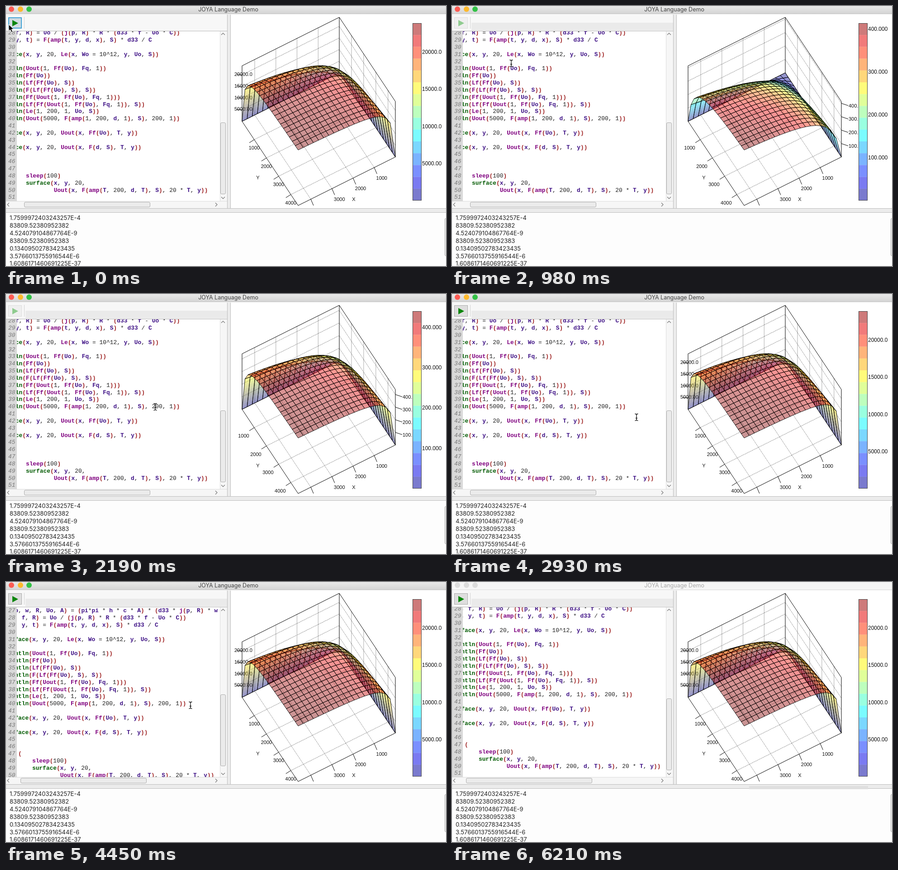
These frames come from a looping animation (973x576 px, 6.31 s). An HTML page:

```html
<!DOCTYPE html>
<html lang="en">
<head>
<meta charset="utf-8">
<title>JOYA Language Demo</title>
<style>
html, body { margin: 0; width: 100%; height: 100%; overflow: hidden; background: #fff; }
#stage { position: relative; width: 973px; height: 576px; overflow: hidden; background: #fff; }
#stage div, #stage svg { position: absolute; box-sizing: border-box; }
#stage svg { left: 0; top: 0; overflow: visible; }

#title { left: 0; top: 0; width: 973px; height: 18px; border-bottom: 1px solid #c6c6c6;
  background: linear-gradient(#e9e9e9, #d4d4d4);
  font: 12.5px/15px Inter, sans-serif; color: #444; text-align: center; padding-left: 10px; }
#title i { position: absolute; top: 1px; width: 12px; height: 12px; border-radius: 50%; background: var(--c); }
#title.idle { background: #f6f6f6; color: #a8a8a8; border-color: #d6d6d6; }
#title.idle i { background: #dcdcdc; }

#tools { left: 0; top: 19px; width: 489px; height: 37px; background: #f7f7f7; border-bottom: 1px solid #b8b8b8; }
#band { left: 43px; top: 18px; width: 446px; height: 17px; background: #eaeaea; }
#tools .sep { left: 40px; top: 5px; width: 1px; height: 26px; background: #d2d2d2; }
#run { left: 5px; top: 6px; width: 30px; height: 25px; border: 1px solid #a9a9a9; background: #dedede; }
#run.hot { border: 2px solid #42a3d6; background: #d0dbe1; }
#run.off { border-color: #dcdcdc; background: #efefef; }
#run::after { content: ""; position: absolute; left: 50%; top: 50%; margin: -7px 0 0 -6px;
  border: solid transparent; border-width: 7px 0 7px 13px; border-left-color: #0c860c; }
#run.off::after { border-left-color: #8fcb8f; }

.mono { font: 12.9px/15.83px "Liberation Mono", monospace; white-space: pre; color: #222; }
#gutter { left: 0; top: 56px; width: 24px; height: 376px; background: #d9d9d9; overflow: hidden; }
#nums { left: 5px; top: -51.2px; font-style: italic; color: #777; }
#editor { left: 24px; top: 56px; width: 449px; height: 376px; background: #fff; overflow: hidden; }
#code { left: -42px; top: -51.2px; }
.fn { color: #7f007f; font-weight: bold; }
.cmd { color: #005a00; font-weight: bold; }
.var { color: #3f1286; font-weight: bold; }
.par { color: #a02525; font-weight: bold; }

.track { background: #f6f6f6; }
.thumb { border: 1px solid #adadad; border-radius: 3px; background: #ebebeb; }
.split { background: #ececec; border: 0 solid #bcbcbc; }
#out { left: 8px; top: 461.3px; font: 13px/16.85px Inter, sans-serif; color: #222; white-space: pre; }
#plot text { font: 11px "Liberation Sans", Arial, sans-serif; fill: #111; }
#plot .big { font-size: 12px; }
</style>
</head>
<body>
<div id="stage">
  <div id="title">JOYA Language Demo<i style="left:6px;--c:#fc5b53"></i><i style="left:26px;--c:#fdb92c"></i><i style="left:45px;--c:#32c146"></i></div>
  <div id="tools"><div id="band"></div><div class="sep"></div><div id="run"></div></div>
  <div id="gutter"><div id="nums" class="mono"></div></div>
  <div id="editor"><div id="code" class="mono"></div></div>
  <div class="track" style="left:473px;top:56px;width:16px;height:376px;border-left:1px solid #dcdcdc"></div>
  <div class="track" style="left:0;top:432px;width:489px;height:16px;border-top:1px solid #dcdcdc"></div>
  <div id="vthumb" class="thumb" style="left:474px;top:258px;width:12px;height:159px"></div>
  <div id="hthumb" class="thumb" style="left:40px;top:434px;width:279px;height:12px"></div>
  <svg width="489" height="448" fill="none" stroke="#777" stroke-width="1.2">
    <path d="M476 64l4-4 4 4M476 423l4 4 4-4M7 436l-4 4 4 4M463 436l4 4-4 4"/>
  </svg>
  <div class="split" style="left:489px;top:19px;width:8px;height:429px;border-width:0 1px"></div>
  <div class="split" style="left:0;top:448px;width:973px;height:10px;border-width:1px 0"></div>
  <div style="left:0;top:458px;width:973px;height:118px;background:#fdfdfd"></div>
  <div id="out">1.7599972403243257E-4
83809.52380952382
4.524079104867764E-9
83809.52380952383
0.13409502783423435
3.5766013755916544E-6
1.6086171460691225E-37</div>
  <div class="thumb" style="left:970px;top:470px;width:10px;height:84px"></div>
  <div id="trace" style="left:657px;top:452px;width:263px;height:7px;background:#dfdfdf"></div>
  <svg id="plot" width="973" height="448"></svg>
  <svg id="cursor" width="1" height="1">
    <defs><path id="bar" d="M-3.5-7.5Q0-7.5 0-5Q0-7.5 3.5-7.5M0-5V5M-3.5 7.5Q0 7.5 0 5Q0 7.5 3.5 7.5M-2 2H2"/></defs>
    <path id="arrow" d="M0 0V14.5L3.4 11.4 6 17.2 8.7 16 6.2 10.4H11Z" fill="#000" stroke="#fff" stroke-width="1"/>
    <g id="beam" fill="none">
      <use href="#bar" stroke="#fff" stroke-width="3" opacity=".7"/>
      <use href="#bar" stroke="#111" stroke-width="1.3"/>
    </g>
  </svg>
</div>
<script>
const LOOP = 6310;
const $ = id => document.getElementById(id);
const stepAt = (rows, t) => rows.filter(r => r[0] <= t).pop();

// Editor text, from line 25 on
const lines = `Lf(Uo) = Uo * C / d33
Fp(Uo, A) = (pi*pi * h * c * A / (240 * Fo))^0.25
E(hp, w, R, Uo, A) = (pi*pi * h * c * A) * (d33 * j(p, R) * w * d33 / C)
U(p, f, R) = Uo / (j(p, R) * R * (d33 * f - Uo * C))
L(x, y, t) = F(amp(t, y, d, x), S) * d33 / C

surface(x, y, 20, Le(x, Wo = 10^12, y, Uo, S))

println(Uout(1, Ff(Uo), Fq, 1))
println(Ff(Uo))
println(Lf(Ff(Uo), S))
println(F(Lf(Ff(Uo), S), S))
println(Ff(Uout(1, Ff(Uo), Fq, 1)))
println(Lf(Ff(Uout(1, Ff(Uo), Fq, 1)), S))
println(Le(1, 200, 1, Uo, S))
println(Uout(5000, F(amp(1, 200, d, 1), S), 200, 1))

surface(x, y, 20, Uout(x, Ff(Uo), T, y))

surface(x, y, 20, Uout(x, F(d, S), T, y))


for (
        sleep(100)
        surface(x, y, 20,
                Uout(x, F(amp(T, 200, d, T), S), 20 * T, y))
`.split("\n");

const paint = line => line.replace(/[a-z]\w*(\(?)|[()]/gi, (m, open) => {
  const word = m.replace("(", "");
  const span = (cls, s) => `<span class="${cls}">${s}</span>`;
  if (!word || m === ")") return span("par", m);
  const cls = /^(surface|println|for)$/.test(word) ? "cmd" : open ? "fn" : "var";
  return span(cls, word) + (open ? span("par", "(") : "");
});
$("code").innerHTML = lines.map(paint).join("\n");
$("nums").textContent = lines.map((_, i) => i + 25).join("\n");

// Parallel projection: u runs along X, v along Y, w is the height
const HEIGHT = 123, SPAN = 4600, N = 19;
const at = (u, v, w = 0) => [737 - 215 * u + 124 * v, 148 + 107.5 * u + 186.5 * v - HEIGHT * w];
const pt = p => p.map(n => n.toFixed(1)).join();
const poly = (pts, attrs = "") => `<polyline points="${pts.map(pt).join(" ")}" ${attrs}/>`;
const area = (pts, attrs) => `<polygon points="${pts.map(pt).join(" ")}" ${attrs}/>`;
const label = (x, y, s, attrs = "") => `<text x="${x}" y="${y + 4}" ${attrs}>${s}</text>`;
const MID = 'text-anchor="middle"';

const mix = (a, b, k) => a.map((n, i) => n + (b[i] - n) * k);
const rgb = c => `rgb(${c.map(Math.round)})`;
const jet = w => [3, 2, 1].map(k => 255 * Math.max(0, Math.min(1, 1.5 - Math.abs(4 * w - k))));

function axes(zmax, left) {
  const dots = 'stroke-dasharray="1 2"';
  const zstep = zmax > 1000 ? 5000 : 100;
  let lineArt = "", text = "";
  for (let k = 1; k <= 4; k++) {
    const s = k * 1000 / SPAN, w = k * zstep / zmax;
    lineArt += poly([at(s, 0, 1), at(s, 0), at(s, 1)], dots)
      + poly([at(0, s, 1), at(0, s), at(1, s)], dots);
    const [xx, xy] = at(s, 1), [yx, yy] = at(1, s);
    lineArt += poly([[xx, xy], [xx + 6, xy + 14]]) + poly([[yx, yy], [yx - 11, yy + 7]]);
    if (k < 4) text += label(xx + 16.5, xy + 23, k * 1000, MID);
    text += label(yx - (left ? 0 : 23.5), yy + 18, k * 1000, MID);
    if (w > 1) continue;
    lineArt += poly([at(1, 0, w), at(0, 0, w), at(0, 1, w)], dots);
    const [zx, zy] = left ? at(1, 0, w) : at(0, 1, w);
    const value = (k * zstep).toFixed(3).slice(0, 7);
    lineArt += poly([[zx, zy], left ? [zx - 12, zy - 1] : [zx + 15, zy + 5]]);
    text += left ? label(505, zy - 1.5, value) : label(877, zy + 5, value);
  }
  lineArt += poly([at(1, 0), at(1, 0, 1), at(0, 0, 1), at(0, 1, 1), at(0, 1)])
    + poly([at(0, 0, 1), at(0, 0)])
    + poly([at(0, 0), at(1, 0), at(1, 1), at(0, 1), at(0, 0)]);
  text += label(769, 428, "X", MID) + label(557, 380, "Y", MID);
  return `<g fill="none" stroke="#000" stroke-width="1">${lineArt}</g>${text}`;
}

// One mesh cell, shaded in strips between the colours of its low and high edges
function cell(low, high, strips) {
  const tone = edge => mix(jet(edge[0][2]), jet(edge[1][2]), .5);
  const from = tone(low), to = tone(high);
  const cut = k => low.map((p, i) => at(...mix(p, high[i], k)));
  let s = "";
  for (let i = 0; i < strips; i++) {
    const [a, b] = cut(i / strips), [d, c] = cut((i + 1) / strips);
    s += area([a, b, c, d], `fill="${rgb(mix(from, to, (i + .5) / strips))}" stroke="none"`);
  }
  const [a, b] = cut(0), [d, c] = cut(1);
  return s + area([a, b, c, d], 'fill="none"');
}

function surface(c) {
  const node = (i, j) => {
    const u = i / N, v = j / N;
    return [u, v, u * v / (u * v + c) * (1 + c)];
  };
  const cells = [];
  for (let i = 0; i < N; i++) for (let j = 0; j < N; j++) {
    const [a, b, d, e] = [node(i, j), node(i + 1, j), node(i, j + 1), node(i + 1, j + 1)];
    const strips = Math.min(i, j) === 0 ? 12 : 1;
    cells.push([i + j, i < j ? cell([a, d], [b, e], strips) : cell([a, b], [d, e], strips)]);
  }
  cells.sort((p, q) => p[0] - q[0]);
  return `<g fill-opacity=".42" stroke="#000" stroke-width=".9" stroke-linejoin="round" shape-rendering="crispEdges">${cells.map(p => p[1]).join("")}</g>`;
}

function colorbar(zmax) {
  const top = 38, size = 393, bands = 15, zstep = zmax > 1000 ? 5000 : 100;
  let s = `<rect x="899" y="${top}" width="20" height="${size}" fill="#fff"/>`;
  for (let i = 0; i < bands; i++)
    s += `<rect x="899" y="${top + size * i / bands}" width="20" height="${size / bands}" fill="${rgb(jet(1 - (i + .5) / bands))}" fill-opacity=".52"/>`;
  s += `<rect x="899.5" y="${top + .5}" width="19" height="${size - 1}" fill="none" stroke="#444"/>`;
  for (let z = zstep; z < zmax; z += zstep)
    s += label(920, top + size * (1 - z / zmax), z.toFixed(3).slice(0, 7), 'class="big"');
  return s;
}

function drawPlot(t) {
  const done = t < 300 || t >= 2330;
  const c = done ? .03 : 1 / Math.max(4, 10 + (t - 980) / 62);
  const zmax = done ? 23900 : 455 / (1 + c);
  $("plot").innerHTML = axes(zmax, done) + surface(c) + colorbar(zmax);
}

const plotTimes = [0, 300, 660, 820, 980, 1270, 1430, 1600, 1750, 1900, 2040, 2190, 2330].map(t => [t]);

// time, x shift, y shift
const scroll = [[0, 0, 0], [3530, 1, 11], [3680, 3, 28], [3830, 5, 44.5], [3970, 8, 50],
  [4150, 10, 52], [4450, 14, 20], [4600, 15, 0]];

// time, shape, x, y
const pointer = [[0, "arrow", 6, 41], [660, "beam", 60, 80], [820, "beam", 105, 110],
  [980, "beam", 131, 127], [1270, "beam", 135, 128], [1430, "beam", 141, 129], [1600, "beam", 148, 131],
  [1750, "beam", 170, 143], [1900, "beam", 205, 168], [2040, "beam", 260, 205], [2190, "beam", 330, 250],
  [2330, "beam", 420, 305], [2480, "arrow", 507, 352], [2780, "beam", 450, 305], [2930, "beam", 408, 273],
  [4900, "arrow", 540, 350], [5050, "arrow", 660, 427], [5200, "arrow", 750, 475], [5350, "arrow", 830, 515],
  [5500, "arrow", 895, 535], [5650, "arrow", 915, 541], [5800, "", 0, 0]];

const show = (id, on) => { $(id).style.display = on ? "" : "none"; };

let shown = -1;
function frame(now) {
  const t = now % LOOP;

  const [plotTime] = stepAt(plotTimes, t);
  if (plotTime !== shown) drawPlot(shown = plotTime);

  const [, dx, dy] = stepAt(scroll, t);
  $("code").style.transform = `translate(${dx}px, ${dy}px)`;
  $("nums").style.transform = `translateY(${dy}px)`;
  $("hthumb").style.left = 40 - dx * .6 + "px";
  $("vthumb").style.top = 258 - dy * .427 + "px";

  const [, shape, x, y] = stepAt(pointer, t);
  $("cursor").style.transform = `translate(${x}px, ${y}px)`;
  for (const id of ["arrow", "beam"]) show(id, id === shape);

  $("run").className = t < 300 ? "hot" : t < 2330 ? "off" : "";
  $("title").className = t >= 6210 ? "idle" : "";
  show("band", t >= 300);
  show("trace", t >= 5800);
}

const start = performance.now();
function tick() {
  frame(performance.now() - start);
  requestAnimationFrame(tick);
}
tick();
</script>
</body>
</html>
```
